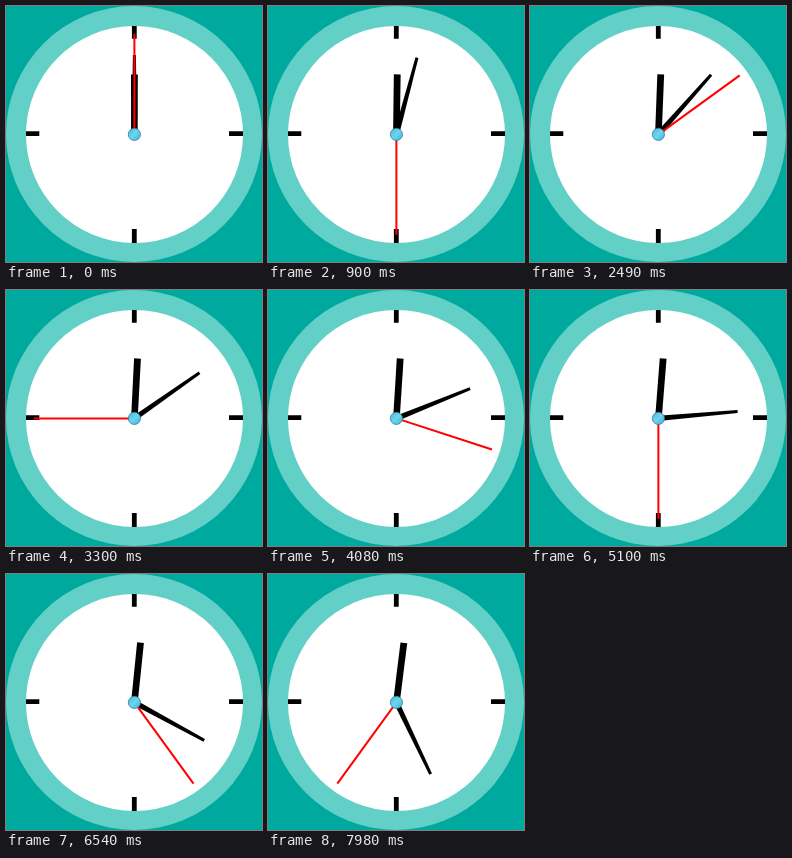
An HTML page for the animation above (8 s loop, 256 by 256 pixels).

```html
<!DOCTYPE html>
<html lang="en">
<head>
<meta charset="utf-8">
<title>Clock</title>
<style>
  html, body { margin: 0; height: 100%; overflow: hidden; background: #00a99d; }
  svg { display: block; width: 100%; height: 100%; }
</style>
</head>
<body>
<svg viewBox="0 0 256 256">
  <defs>
    <linearGradient id="glass" x1="0" y1="0" x2="1" y2="1">
      <stop offset="0" stop-color="#4ab9da"/>
      <stop offset=".5" stop-color="#6cd5f0"/>
      <stop offset="1" stop-color="#3fb0d2"/>
    </linearGradient>
  </defs>
  <circle cx="128" cy="128" r="128" fill="#62d0c7"/>
  <circle cx="128.5" cy="128.5" r="108.5" fill="#fff"/>
  <path d="M128.3 20v12.7M128.3 223v14M20 127.7h13.3M223 127.7h14" stroke="#000" stroke-width="4.8"/>
  <g transform="translate(128.4 128.4)">
    <path id="hour" d="M-3.3 0L-3.4 -60H3.4L3.3 0z"/>
    <path id="minute" d="M-2.7 0L-1.5 -79.5H1.5L2.7 0z"/>
    <path id="second" d="M0 0V-100.5" stroke="#f00" stroke-width="2"/>
    <circle r="6.1" fill="url(#glass)" stroke="#35809b" stroke-width=".8"/>
  </g>
</svg>
<script>
  const LOOP = 8000, STEP = 30;
  const hands = ['hour', 'minute', 'second'].map(id => document.getElementById(id));

  // Each cycle has one even turn of 20 steps, then five turns of 15 steps
  // whose left half runs at double speed.
  function secondAngle(step) {
    const inCycle = step % 95;
    if (inCycle < 20) return inCycle * 18;
    const inTurn = (inCycle - 20) % 15;
    return inTurn <= 10 ? inTurn * 18 : 180 + (inTurn - 10) * 36;
  }

  // The minute hand speeds up after its first quarter turn.
  const minuteAngle = step => step * 0.5 + Math.max(0, step - 180) * 0.25;
  const hourAngle = step => step * 0.0268;

  function draw() {
    const step = Math.floor(performance.now() % LOOP / STEP);
    [hourAngle, minuteAngle, secondAngle].forEach((angle, i) =>
      hands[i].setAttribute('transform', `rotate(${angle(step)})`));
    requestAnimationFrame(draw);
  }
  draw();
</script>
</body>
</html>
```
